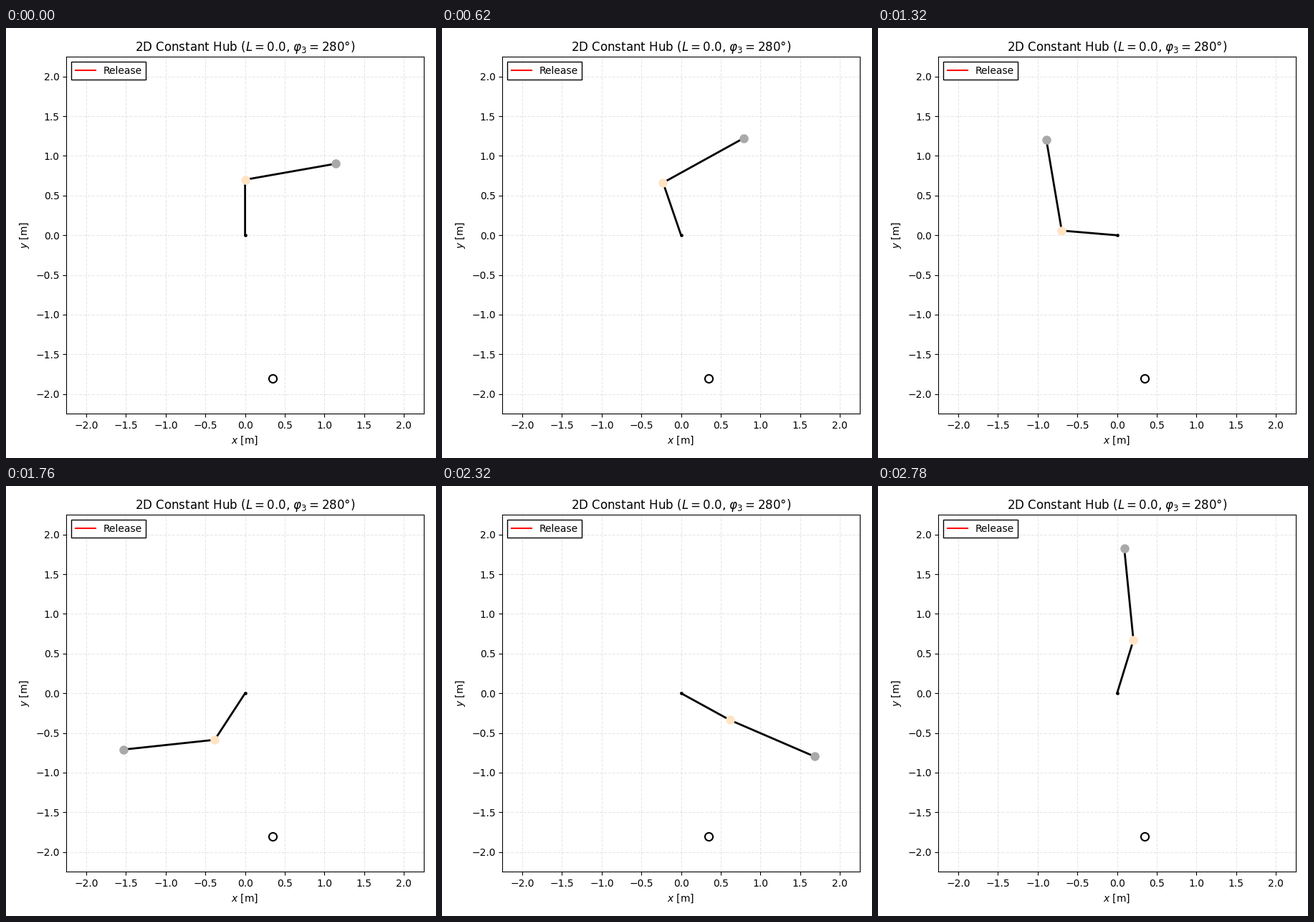
These frames come from a looping animation (600 by 600 pixels, 2800 ms). A matplotlib script:

```python
import numpy as np
import matplotlib.pyplot as plt
from matplotlib.animation import FuncAnimation

FRAMES, STEP_MS = 140, 20
ARM, CLUB = 0.70, 1.16
BALL = (0.35, -1.805)

# time [s], arm angle [deg], its rate, wrist angle [deg], its rate
POSES = np.array([
    (0.00, 90.0, 0.0, 80.0, 0.0),
    (0.83, 123.9, 81.7, 80.0, 0.0),
    (1.32, 175.2, 125.5, 75.6, -26.0),
    (1.76, 236.9, 150.5, 50.8, -88.0),
    (2.10, 291.2, 169.0, 16.7, -115.0),
    (2.54, 376.6, 217.0, -21.5, -60.0),
    (2.78, 432.9, 253.0, -22.8, 50.0),
])


def hermite(s, h, p0, v0, p1, v1):
    """Cubic between two values with given slopes, s in 0..1."""
    return ((2*s**3 - 3*s**2 + 1) * p0 + (3*s**2 - 2*s**3) * p1
            + h * ((s**3 - 2*s**2 + s) * v0 + (s**3 - s**2) * v1))


def swing(t):
    """Return hub, wrist and club head positions at time t."""
    i = np.clip(np.searchsorted(POSES[:, 0], t, side="right") - 1,
                0, len(POSES) - 2)
    a, b = POSES[i], POSES[i + 1]
    h = b[0] - a[0]
    s = (t - a[0]) / h
    arm = hermite(s, h, a[1], a[2], b[1], b[2])
    wrist = hermite(s, h, a[3], a[4], b[3], b[4])
    th1, th2 = np.radians([arm, arm - wrist])
    joint = ARM * np.array([np.cos(th1), np.sin(th1)])
    head = joint + CLUB * np.array([np.cos(th2), np.sin(th2)])
    return np.array([(0, 0), joint, head])


fig = plt.figure(figsize=(6, 6), dpi=100)
ax = fig.add_axes([84.4 / 600, 61.6 / 600, 498.4 / 600, 498.4 / 600])
ax.set(xlim=(-2.25, 2.25), ylim=(-2.25, 2.25))
ticks = np.arange(-2, 2.1, 0.5)
ax.set_xticks(ticks)
ax.set_yticks(ticks)
ax.set_axisbelow(True)
ax.grid(linestyle="--", alpha=0.3)
ax.set_xlabel("$x$ [m]")
ax.set_ylabel("$y$ [m]")
ax.set_title(r"2D Constant Hub ($L=0.0$, $\varphi_3=280$°)")

ax.plot([], [], color="red", lw=1.5, label="Release")
ax.plot(*BALL, "o", ms=8, mfc="white", mec="black", mew=1.5, zorder=2)
links, = ax.plot([], [], color="black", lw=2, zorder=3)
ax.plot(0, 0, "o", color="black", ms=3, mew=0.3, zorder=4)
joint_dot, = ax.plot([], [], "o", color="bisque", ms=8, zorder=5)
head_dot, = ax.plot([], [], "o", color="darkgray", ms=8, zorder=5)
ax.legend(loc="upper left", fancybox=False, edgecolor="black", framealpha=1)


def update(i):
    pts = swing(i * STEP_MS / 1000)
    links.set_data(pts[:, 0], pts[:, 1])
    joint_dot.set_data(pts[1:2, 0], pts[1:2, 1])
    head_dot.set_data(pts[2:, 0], pts[2:, 1])
    return links, joint_dot, head_dot


anim = FuncAnimation(fig, update, frames=FRAMES, interval=STEP_MS,
                     repeat=True, repeat_delay=0)
plt.show()
```
